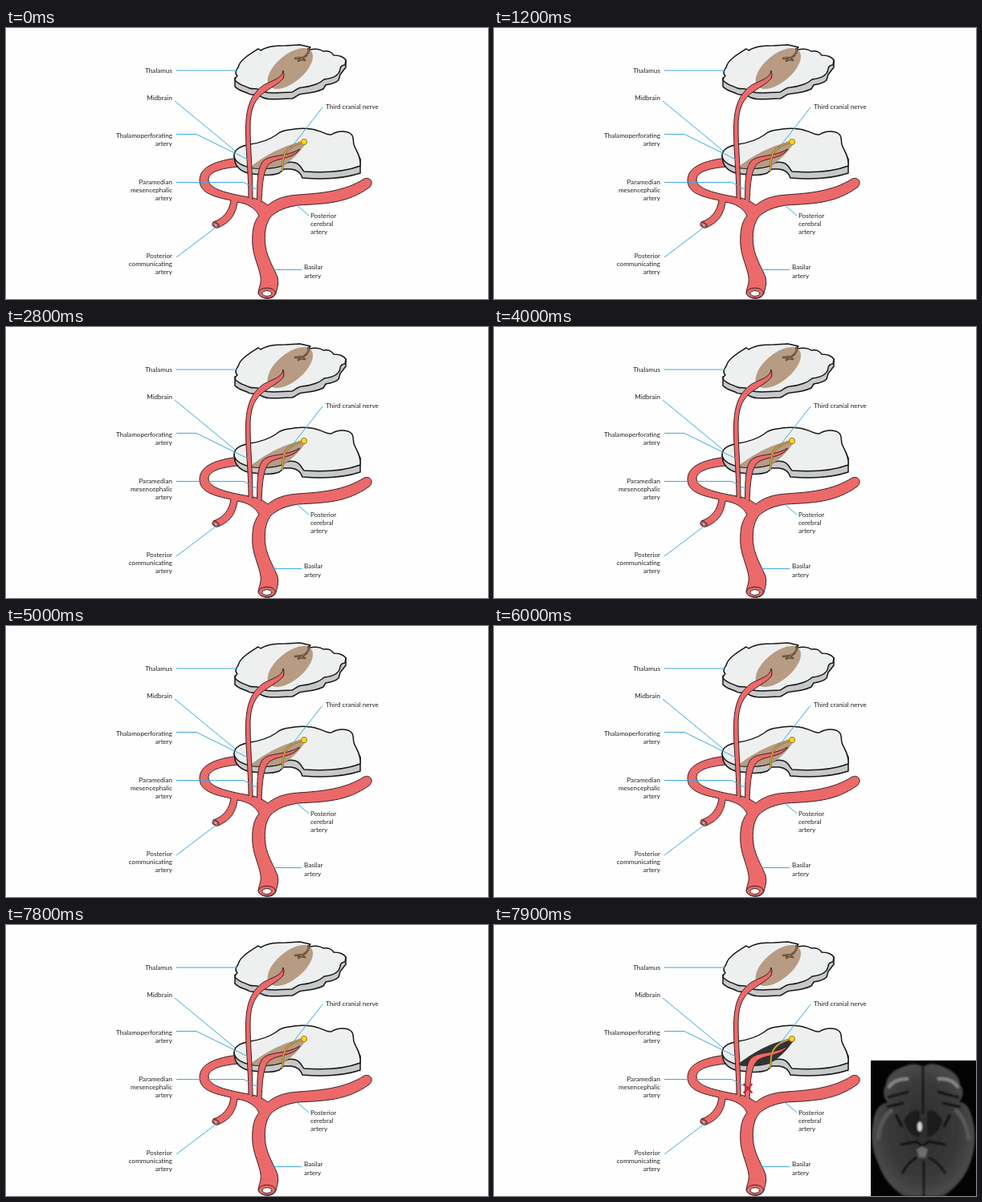
Animation, 600 px wide and 338 px high, one loop 8 s. Source, as an HTML page:

```html
<!DOCTYPE html>
<html lang="en">
<head>
<meta charset="utf-8">
<title>Midbrain arteries</title>
<style>
html, body { margin: 0; width: 100%; height: 100%; overflow: hidden; background: #fefefe; }
svg { display: block; width: 100vw; height: 100vh; }
text { font: 8.1px Lato, "Open Sans", sans-serif; fill: #222; }
.slab { stroke: #151515; stroke-width: 1.5; stroke-linejoin: round; }
.side { fill: #c6c8c9; }
.top { fill: #eef0f0; }
.leader { fill: none; stroke: #3fa9dc; stroke-width: 1; }
.vessel { fill: #ec696a; stroke: #3a2020; stroke-width: 1; stroke-linejoin: round; }
.tan { fill: #b79b83; }
.late { visibility: hidden; }
.blocked .late { visibility: visible; }
.blocked #wedge { fill: #333; }
</style>
</head>
<body>
<svg id="stage" viewBox="0 0 600 338">
  <defs>
    <radialGradient id="tissue" cx=".5" cy=".5" r=".56">
      <stop offset="0" stop-color="#2c2c2c"/>
      <stop offset=".65" stop-color="#3a3a3a"/>
      <stop offset=".9" stop-color="#4a4a4a"/>
      <stop offset="1" stop-color="#303030"/>
    </radialGradient>
    <filter id="soft" x="-30%" y="-30%" width="160%" height="160%"><feGaussianBlur stdDeviation="1.2"/></filter>
    <clipPath id="frame"><path d="M469 169H600V338H469Z"/></clipPath>
  </defs>

  <!-- basilar trunk, both posterior cerebral arteries and the communicating branch -->
  <path class="vessel" d="M290 162C262 165 241 173 241 190C241 207 262 211 280 215C278 229 270 238 258 242L264 249C280 242 286 232 288 217
    C300 219 310 224 315 234C307 243 306 258 307 272C309 288 315 298 317 311C318 318 315 323 314 330C316 339 333 340 336 331
    C337 326 340 320 338 311C335 302 325 287 323 272C321 257 323 245 329 236C338 227 350 223 364 221C398 219 424 219 452 199
    C459 193 453 185 446 188C421 204 392 206 364 208C346 209 334 214 326 221C318 215 310 212 302 211
    C275 206 252 201 252 189C252 180 266 175 290 173Z"/>
  <ellipse class="vessel" cx="324.8" cy="330.5" rx="10.6" ry="6.3"/>
  <ellipse cx="324.8" cy="331" rx="6" ry="3.4" fill="#fff" stroke="#3a2020"/>
  <ellipse class="vessel" cx="261" cy="245.7" rx="4.3" ry="2.9" transform="rotate(35 261 245.7)"/>
  <ellipse cx="261" cy="245.8" rx="2" ry="1.2" fill="#fff" stroke="#3a2020" stroke-width=".7"/>

  <!-- midbrain -->
  <path class="slab side" d="M284 159L285 167C288 176 297 181 308 182C320 184 332 184 340 181L346 176H355C362 177 367 180 369 187C392 189 420 188 441 181V163L372 150Z"/>
  <path class="slab top" d="M284 159C284 151 293 147 304 145C318 143 327 140 337 133C345 126 352 128 359 126C368 125 379 125 388 128C396 130 399 134 405 133C414 127 427 128 431 134C434 140 431 143 434 148C437 155 442 161 441 172C422 179 396 181 371 179C367 175 367 170 360 168C352 166 348 168 343 172C332 176 313 176 303 174C292 171 284 167 284 159Z"/>
  <path id="wedge" class="tan" d="M303 174C316 164 330 155 345 149C355 145 366 142 372 142Q375 144 371 147C363 158 355 166 345 171Q327 177 303 174Z"/>

  <!-- thalamus -->
  <path class="slab side" d="M285 62V73C289 78 296 79 302 82C306 85 312 81 318 86C327 91 342 88 356 88C361 87 363 82 369 82C380 81 389 79 395 76L398 71C405 70 411 68 414 65L416 58L423 49V40L350 50Z"/>
  <path class="slab top" d="M287 67C284 65 285 62 288 60C284 56 287 52 289 49C291 40 303 33 314 26L317 28C327 22 338 22 348 22L366 21L379 24L375 28C382 25 391 26 395 29C402 28 405 30 408 34C416 34 421 37 423 40L422 46C419 46 416 48 416 51C415 60 405 63 396 64C391 69 380 73 369 74C363 74 361 78 356 80C343 80 329 83 319 79C314 74 308 77 303 75C297 72 291 71 287 67Z"/>
  <ellipse class="tan" cx="353.8" cy="50.5" rx="34" ry="17" transform="rotate(-40 353.8 50.5)"/>
  <g fill="none" stroke-linecap="round" stroke-linejoin="round">
    <path id="cleft" d="M376 26L377 29L374 34L370 37L360 38M370 37L364 41M367 39L372 40" stroke="#44301f" stroke-width="2.3"/>
    <path d="M376 26L377 29L374 34L370 37L360 38M370 37L364 41M367 39L372 40" stroke="#a88b70" stroke-width=".9"/>
  </g>

  <!-- perforating branches stay open where they join the trunk -->
  <path class="vessel" d="M302 212C302 180 298 150 298.500 124C299 98 305 82 321 71C332 65 344 63 345 53Q347 58 345 63C340 69 332 73 325 78C309 88 304 101 304 124C304 150 307 180 307 214"/>
  <path class="vessel" d="M312.500 214C313 195 312 178 319 167C328 157 347 162 366 151C357 164 339 161 328 169C320 177 319 196 318 217"/>

  <!-- third cranial nerve -->
  <g fill="none">
    <path d="M370 142C354 146 346 153 345 165L344 178" stroke="#76551d" stroke-width="2.5"/>
    <path d="M370 142C354 146 346 153 345 165L344 178" stroke="#d6ad4c" stroke-width="1.4"/>
    <circle cx="371" cy="142" r="3.6" fill="#ffd51c" stroke="#8a651b" stroke-width=".8"/>
  </g>

  <path class="leader" d="M212 53H288M210 91L285 153M212 132.500H237L301 164M212 192.500H296L313 202M212 286L262 248M394 99L355 149M377 234L362 221M368 301.500H333"/>
  <g id="labels"></g>

  <path class="late" d="M310.500 198L321.500 209.500M321.500 198L310.500 209.500" stroke="#d2202a" stroke-width="2.1"/>

  <!-- scan -->
  <g class="late" clip-path="url(#frame)">
    <path d="M469 169H600V338H469Z" fill="#030303"/>
    <g filter="url(#soft)">
      <path d="M534 178C528 170 514 174 506 178C496 181 488 190 488 199C483 207 485 216 490 222C478 222 473 235 472 248C468 266 472 285 479 299C485 317 496 329 510 338H560C576 327 588 313 593 296C599 280 600 260 596 244C593 230 588 220 579 221C585 214 585 205 580 199C580 188 570 181 560 177C550 173 540 171 534 178Z" fill="url(#tissue)"/>
      <path d="M491 203Q498 191 516 192M552 192Q570 190 578 203" fill="none" stroke="#858585" stroke-width="4"/>
      <path d="M478 268Q480 242 496 230M591 268Q588 242 574 230" fill="none" stroke="#585858" stroke-width="5"/>
      <path d="M490 215L516 208M552 208L579 215M489 227L510 222M558 222L581 227M500 236L508 252M568 236L560 252" stroke="#0d0d0d" stroke-width="3"/>
      <path d="M510 244Q518 228 530 232V264Q516 264 510 244M558 244Q550 228 539 232V264Q552 264 558 244" fill="#1b1b1b"/>
      <path d="M534 174V236M535 294V338" stroke="#080808" stroke-width="2.500"/>
      <path d="M506 274L526 270L533 276L541 270L562 274M526 290Q515 296 508 310M541 290Q554 296 562 310" fill="none" stroke="#101010" stroke-width="3"/>
      <path d="M526 280L533 276L540 280L537 290H529Z" fill="#6d6d6d"/>
      <ellipse cx="530" cy="251.500" rx="2.800" ry="6" fill="#d8d8d8"/>
    </g>
  </g>
</svg>
<script>
const stage = document.getElementById("stage");
const labels = document.getElementById("labels");

function label(x, y, anchor, ...lines) {
  lines.forEach((line, i) => {
    const t = document.createElementNS(stage.namespaceURI, "text");
    t.setAttribute("x", x);
    t.setAttribute("y", y + i * 10.2);
    t.setAttribute("text-anchor", anchor);
    t.textContent = line;
    labels.append(t);
  });
}

label(207, 56.3, "end", "Thalamus");
label(207, 90.3, "end", "Midbrain");
label(207, 137, "end", "Thalamoperforating", "artery");
label(207, 194.7, "end", "Paramedian", "mesencephalic", "artery");
label(207, 286.8, "end", "Posterior", "communicating", "artery");
label(398, 101.3, "start", "Third cranial nerve");
label(379, 236.5, "start", "Posterior", "cerebral", "artery");
label(371, 301.3, "start", "Basilar", "artery");

const LOOP = 8000, BLOCKED_AT = 7850;
const start = performance.now();

function draw() {
  const t = (performance.now() - start) % LOOP;
  stage.classList.toggle("blocked", t >= BLOCKED_AT);
  requestAnimationFrame(draw);
}
draw();
</script>
</body>
</html>
```
